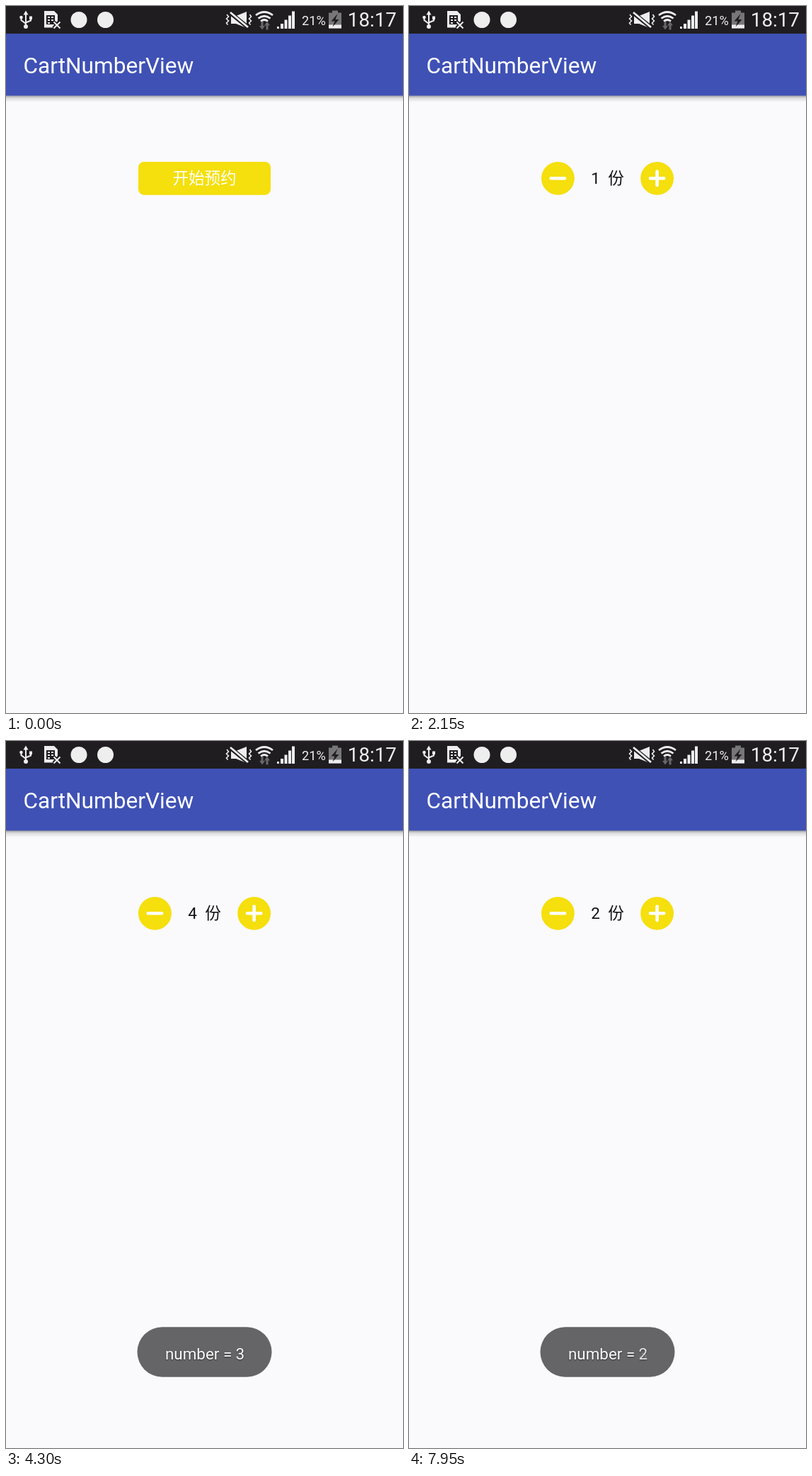
An HTML page that plays this animation: 561 px wide and 998 px high, repeating every 8000 ms.

```html
<!DOCTYPE html>
<html lang="zh">
<head>
<meta charset="utf-8">
<title>CartNumberView</title>
<style>
  html, body { margin: 0; width: 100%; height: 100%; overflow: hidden; background: #faf9fc; }
  svg { display: block; width: 100%; height: 100%; }
  text { font-family: Roboto, "Noto Sans CJK SC", "Noto Sans CJK", sans-serif; white-space: pre; }
  .label { font-size: 22.5px; text-anchor: middle; }
  .line { fill: none; stroke: #eee; }
  .icon { stroke: #fff; stroke-width: 4.6; stroke-linecap: round; }
  #toast text { font-size: 27px; font-stretch: 75%; fill: #fafafa; text-shadow: 0 1px 2px #0008; }
</style>
</head>
<body>
<svg viewBox="0 0 561 998">
  <defs>
    <linearGradient id="shade" x2="0" y2="1">
      <stop stop-color="#000" stop-opacity=".4"/>
      <stop offset=".4" stop-color="#000" stop-opacity=".12"/>
      <stop offset="1" stop-color="#000" stop-opacity="0"/>
    </linearGradient>
  </defs>
  <rect width="561" height="998" fill="#faf9fc"/>
  <rect y="126" width="561" height="10" fill="url(#shade)"/>
  <rect y="38" width="561" height="88.5" fill="#3f51b5"/>
  <rect width="561" height="39" fill="#1f1d20"/>
  <text x="24.5" y="95" font-size="31.6" fill="#fff">CartNumberView</text>

  <g id="status" fill="#eee">
    <!-- usb -->
    <path d="M28 6.5l3.5 6h-7zM33 14.5h4v4.5h-4z"/>
    <circle cx="28" cy="29" r="3"/><circle cx="21.5" cy="16" r="2.3"/>
    <path class="line" stroke-width="2" d="M28 11v17M21.5 16v4l6.5 5M35 17v3.500l-7 3"/>
    <!-- sim card -->
    <path d="M54 7h14l5 5v9l-7 8v1.500H54z"/>
    <path d="M57 13h12v13H57z" fill="#1f1d20"/>
    <path d="M59 15h3v2h-3zM64 15h3v2h-3zM59 19h3v2h-3zM64 19h3v2h-3zM59 23h3v2h-3z"/>
    <path d="M67.500 22.500l9 9m0-9l-9 9" stroke="#1f1d20" stroke-width="5"/>
    <path class="line" stroke-width="2" d="M67.500 22.500l9 9m0-9l-9 9"/>
    <circle cx="103" cy="19.500" r="11.500"/><circle cx="140.500" cy="19.500" r="11.500"/>
    <!-- vibrate, muted -->
    <path d="M318 14h7l15-6v23l-15-6h-7z"/>
    <path d="M316 9l27 22" stroke="#1f1d20" stroke-width="6"/>
    <path class="line" stroke-width="2.800" d="M317 9l25 21"/>
    <path class="line" stroke-width="1.600" d="M312 12l2.500 3-3 3 3 3-3 3 2 2.500M344.500 12l2 3-3 3 3 3-3 3 2 2.500"/>
    <!-- wifi -->
    <path class="line" stroke-width="2.800" d="M353 13q12-9 24 0M356.500 17.500q8.500-6.500 17 0M360 21.500q5-4 10 0"/>
    <path id="down" d="M360.500 22h3v6h2.500l-4 5.500-4-5.500h2.500z"/>
    <path id="up" d="M367.500 33.500h3v-6h2.500l-4-5.500-4 5.500h2.500z"/>
    <!-- signal -->
    <path d="M383 29h3v3h-3zM388 25h4v7h-4zM393.500 19.500h4v12.500h-4zM399 13.500h4v18.500h-4zM404 7.500h4v24.500h-4z"/>
    <!-- battery -->
    <path d="M461 6.500h8v3h5V31.500h-18V9.500h5z" fill="#777679"/>
    <path d="M456 26.500h18v5h-18z"/>
    <path d="M468.500 11l-9 10.500h5l-3 8 9-10.500h-5z" fill="#1f1d20"/>
    <text x="418" y="27" font-size="18.200">21%</text>
    <text x="552" y="29" font-size="27.800" text-anchor="end">18:17</text>
  </g>

  <g id="intro">
    <rect id="pill" y="220" height="46.700" rx="8" fill="#f5df0c"/>
    <text class="label" x="280.500" y="251" fill="#fff">开始预约</text>
  </g>
  <g id="stepper">
    <text id="count" class="label" y="251" fill="#111"></text>
    <g id="minus"><circle r="23.400" fill="#f5df0c"/><path class="icon" d="M-9.700 0H9.700"/></g>
    <g transform="translate(350.600 243.300)"><circle r="23.400" fill="#f5df0c"/><path class="icon" d="M-9.700 0H9.700M0-9.700V9.700"/></g>
  </g>

  <g id="toast">
    <rect x="185.500" y="827.300" width="190" height="70.500" rx="35.200" fill="#656466"/>
    <text id="prefix" x="225" y="873">number = </text>
    <text id="oldNum" x="337" y="873" text-anchor="end">2</text>
    <text id="newNum" x="337" y="873" text-anchor="end">2</text>
  </g>
</svg>
<script>
const $ = id => document.getElementById(id);
const LOOP = 8000, SHRINK = 828, SLIDE = 1178, SPAN = 350;
const RIGHT = 374, LEFT = 187, PLUS_X = 350.6, TRAVEL = 140.2;
// [time, value] of each tap
const taps = [[0, 1], [2600, 2], [3400, 3], [4300, 4], [5000, 5], [6000, 4], [6850, 3], [7600, 2]];

const progress = (t, start, span) => Math.min(1, Math.max(0, (t - start) / span));
const ease = p => 0.5 - Math.cos(p * Math.PI) / 2;
const show = (id, on) => $(id).style.display = on ? "" : "none";

// Choose the type size that fills the toast's text line
const lineWidth = $("prefix").getComputedTextLength() + $("newNum").getComputedTextLength();
const toastSize = 27 * Math.min(1, 112.5 / lineWidth);
for (const text of document.querySelectorAll("#toast text")) text.style.fontSize = toastSize + "px";

function draw(t) {
  const left = LEFT + TRAVEL * ease(progress(t, SHRINK, SPAN));
  $("pill").setAttribute("x", left);
  $("pill").setAttribute("width", RIGHT - left);
  show("intro", t < SLIDE);
  show("stepper", t >= SLIDE);

  const slide = ease(progress(t, SLIDE, SPAN));
  const minusX = PLUS_X - TRAVEL * slide;
  $("minus").setAttribute("transform", `translate(${minusX} 243.3)`);
  $("count").setAttribute("x", (minusX + PLUS_X) / 2);
  $("count").setAttribute("opacity", slide);

  const i = taps.findLastIndex(tap => t >= tap[0]);
  const [time, value] = taps[i];
  $("count").textContent = value + "  份";

  const fade = i > 1 ? ease(progress(t, time + 50, 420)) : 1;
  $("oldNum").textContent = i > 1 ? taps[i - 1][1] : "";
  $("newNum").textContent = value;
  $("oldNum").setAttribute("opacity", 1 - fade);
  $("newNum").setAttribute("opacity", fade);
  $("toast").setAttribute("opacity", i ? progress(t, 2550, 500) : 0);

  const both = t >= 5250 && t < 7100;
  $("down").setAttribute("fill", both || t >= 2800 && t < 4050 ? "#eee" : "#69676b");
  $("up").setAttribute("fill", both ? "#eee" : "#69676b");
}

function tick() {
  draw(performance.now() % LOOP);
  requestAnimationFrame(tick);
}
tick();
</script>
</body>
</html>
```
